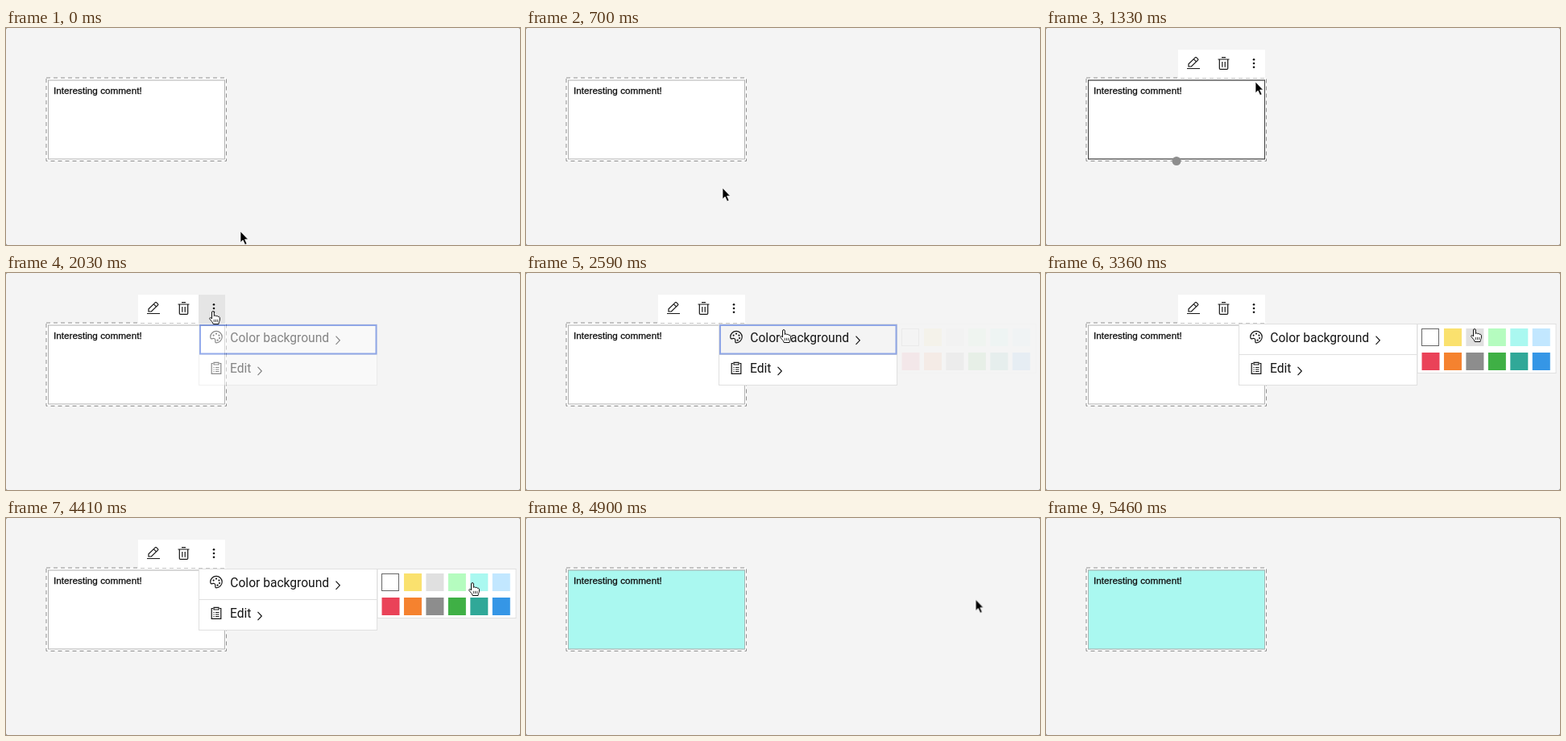
Recreate the animation shown at these times as an HTML page. Size 638x270 px, loop 6.23 s.

```html
<!DOCTYPE html>
<html lang="en">
<head>
<meta charset="utf-8">
<title>Comment background color</title>
<style>
  html, body { margin: 0; width: 100%; height: 100%; overflow: hidden; background: #777; }
  svg { display: block; width: 100vw; height: 100vh; }
  .note { font: 500 11.75px "Liberation Sans", Arial, sans-serif; stroke: #111; stroke-width: .3px; }
  .label { font: 15.6px Roboto, sans-serif; fill: #161616; }
  .line { fill: none; stroke: #161616; stroke-width: 1.2; }
  .panel { fill: #fff; stroke: #e0e0e0; }

  /* One shared clock; values hold unless a keyframe sets its own steps. */
  .anim { animation: 6230ms step-end infinite; }
  .hovered { animation-name: hovered; }
  .tinted { animation-name: tinted; }
  .toolbar { animation-name: toolbar; }
  .more { animation-name: more; }
  .menu { animation-name: menu; }
  .item { animation-name: item; }
  .focus { animation-name: focus; }
  .palette { animation-name: palette; }
  .cursor { animation-name: cursor; }
  .arrow { animation-name: arrow; }
  .hand { animation-name: hand; }

  @keyframes hovered { 0%, 22.47% { opacity: 0 } 14.6% { opacity: 1 } 100% { opacity: 0 } }
  @keyframes tinted { 0% { opacity: 0 } 71.9%, 100% { opacity: 1 } }
  @keyframes toolbar { 0%, 71.9%, 100% { opacity: 0 } 14.6% { opacity: 1 } }
  @keyframes more { 0%, 40.44%, 100% { opacity: 0 } 29.21% { opacity: 1 } }
  @keyframes item { 0%, 51.68%, 100% { opacity: 0 } 40.44% { opacity: 1 } }
  @keyframes arrow { 0%, 71.9%, 100% { opacity: 1 } 28.08% { opacity: 0 } }
  @keyframes hand { 0%, 71.9%, 100% { opacity: 0 } 28.08% { opacity: 1 } }
  @keyframes menu {
    0%, 71.9%, 100% { opacity: 0 }
    30.33% { opacity: 0; animation-timing-function: steps(4) }
    34.83% { opacity: 1 }
  }
  @keyframes focus {
    0% { opacity: 1 }
    39.32% { opacity: 1; animation-timing-function: steps(4) }
    43.81%, 100% { opacity: 0 }
  }
  @keyframes palette {
    0%, 71.9%, 100% { opacity: 0 }
    41.57% { opacity: .07; animation-timing-function: steps(4) }
    46.06% { opacity: 1 }
  }
  @keyframes cursor {
    0% { transform: translate(291px, 253px); animation-timing-function: steps(4) }
    4.49% { transform: translate(238px, 194px); animation-timing-function: steps(2) }
    6.74% { transform: translate(242px, 217px) }
    10.11% { transform: translate(242px, 217px); animation-timing-function: steps(4) }
    14.6% { transform: translate(250px, 145px); animation-timing-function: steps(5) }
    20.22% { transform: translate(259px, 75px) }
    21.34% { transform: translate(260px, 67px); animation-timing-function: steps(3) }
    24.71% { transform: translate(282px, 40px); animation-timing-function: steps(2) }
    26.96% { transform: translate(268px, 17px); animation-timing-function: steps(3) }
    30.33% { transform: translate(262px, 47px) }
    38.2% { transform: translate(262px, 47px); animation-timing-function: steps(3) }
    41.57% { transform: translate(325px, 70px); animation-timing-function: steps(4) }
    46.06% { transform: translate(326px, 72px) }
    49.43% { transform: translate(326px, 72px); animation-timing-function: steps(4) }
    53.93% { transform: translate(537px, 69px); animation-timing-function: steps(5) }
    59.55% { transform: translate(574px, 71px); animation-timing-function: steps(3) }
    62.92% { transform: translate(584px, 80px) }
    77.52% { transform: translate(584px, 80px); animation-timing-function: steps(9) }
    87.64%, 100% { transform: translate(352px, 273px) }
  }
</style>
</head>
<body>
<svg viewBox="0 0 638 270">
  <rect width="638" height="270" rx="2" fill="#f4f4f4"/>

  <rect x="50" y="62" width="223.5" height="103.5" fill="#fff" stroke="#8d8d8d" stroke-dasharray="5 4"/>
  <rect x="52.5" y="65" width="219" height="98" fill="#fff" stroke="#b0b0b0"/>
  <rect class="anim tinted" x="52.5" y="65" width="219" height="98" fill="#aaf8f0" stroke="#a5b5b3"/>
  <g class="anim hovered">
    <rect x="52.5" y="65" width="219" height="98" fill="none" stroke="#393939"/>
    <circle cx="162" cy="165.5" r="5.5" fill="#8d8d8d"/>
  </g>
  <text class="note" x="59" y="82" fill="#111">Interesting comment!</text>

  <g class="anim toolbar">
    <rect x="164" y="27" width="108" height="35" fill="#fff"/>
    <rect class="anim more" x="239" y="27" width="33" height="36" fill="#e5e5e5"/>
    <g class="line">
      <path d="M175 50.5H191M177 48V44.8L185.4 36.6Q186 36 186.6 36.6L188.6 38.6Q189.2 39.2 188.6 39.8L180.3 48ZM183.3 38.7L186.5 41.9"/>
      <path d="M213.5 39H227.5M215.3 39V50.2Q215.3 51.4 216.5 51.4H224.5Q225.7 51.4 225.7 50.2V39M218 36.6H223M218.8 42V48.7M222.2 42V48.7"/>
    </g>
    <g fill="#161616">
      <circle cx="258" cy="39.2" r="1.3"/><circle cx="258" cy="44" r="1.3"/><circle cx="258" cy="48.8" r="1.3"/>
    </g>
  </g>

  <g class="anim menu">
    <rect class="panel" x="239.5" y="63.5" width="221" height="76"/>
    <rect class="anim item" x="240" y="64" width="220" height="37" fill="#f4f4f4"/>
    <path d="M240 101.5H460" stroke="#e0e0e0"/>
    <rect class="anim focus" x="241" y="65" width="218.5" height="35.5" fill="none" stroke="#2a58d8" stroke-width="2"/>
    <g class="line">
      <path d="M261 72.4A7.2 7.2 0 0 1 261 86.8Q259.8 86.8 259.8 85.4V83.4Q259.6 81.2 257.3 81.4Q253.7 82.8 253.7 79.6A7.2 7.2 0 0 1 261 72.4Z"/>
      <path d="M257 112.5H255.2V125.4H266.8V112.5H265M258 111.4H264V114H258ZM257.5 117.5H258.7M260 117.5H264.5M257.5 120H258.7M260 120H264.5M257.5 122.5H258.7M260 122.5H264.5"/>
      <path d="M409.5 78.7L414.3 83.8L409.5 88.9M312.5 116.9L317.3 122L312.5 127.1"/>
    </g>
    <g fill="#161616">
      <circle cx="257.6" cy="77.6" r="1.1"/><circle cx="261" cy="75.6" r="1.1"/><circle cx="264.4" cy="77.6" r="1.1"/>
      <circle cx="265" cy="81" r="1.1"/><circle cx="262.6" cy="83.7" r="1.1"/>
    </g>
    <text class="label" x="278.3" y="86">Color background</text>
    <text class="label" x="278" y="124.3">Edit</text>
  </g>

  <g class="anim palette" id="palette">
    <rect class="panel" x="461" y="63.5" width="172" height="61"/>
  </g>

  <g class="anim cursor">
    <path class="anim arrow" d="M0 0V13.8L3.1 10.9L5.7 16.6L8 15.6L5.5 10H9.5Z" fill="#000" stroke="#fff" stroke-width=".7"/>
    <g class="anim hand" transform="translate(-5 0)">
      <g transform="translate(-5 0)" stroke="#111" stroke-linejoin="round">
        <path fill="#fff" d="M3.5 2a1.4 1.4 0 0 1 2.8 0V6.5c.3-1 2.4-.9 2.6.4.5-.9 2.2-.7 2.4.6.8-.6 2.1-.1 2.1 1.2V11c0 2-1.4 3-1.4 5.5H5.2C5 14.5 2.5 12.5.9 10.2c-.8-1.3.8-2.3 1.8-1.2l.8.9z"/>
        <path fill="none" stroke-width=".8" d="M6.3 10.8V14M8.5 10.8V14M10.7 10.8V14"/>
      </g>
    </g>
  </g>
</svg>
<script>
  const colors = [
    '#ffffff', '#fae16e', '#e0e0e0', '#b5fcbf', '#aaf8f0', '#c2e7ff',
    '#ea4258', '#f5822f', '#8d8d8d', '#3fb045', '#30a898', '#3596e6'
  ];
  const palette = document.getElementById('palette');

  colors.forEach((color, i) => {
    const swatch = document.createElementNS(palette.namespaceURI, 'rect');
    const attributes = {
      x: 466.5 + (i % 6) * 27.45,
      y: i < 6 ? 69 : 99,
      width: 22, height: 22, fill: color
    };
    if (i === 0) Object.assign(attributes, { y: 69.5, width: 21, height: 21, stroke: '#666' });
    for (const name in attributes) swatch.setAttribute(name, attributes[name]);
    palette.append(swatch);
  });
</script>
</body>
</html>
```
